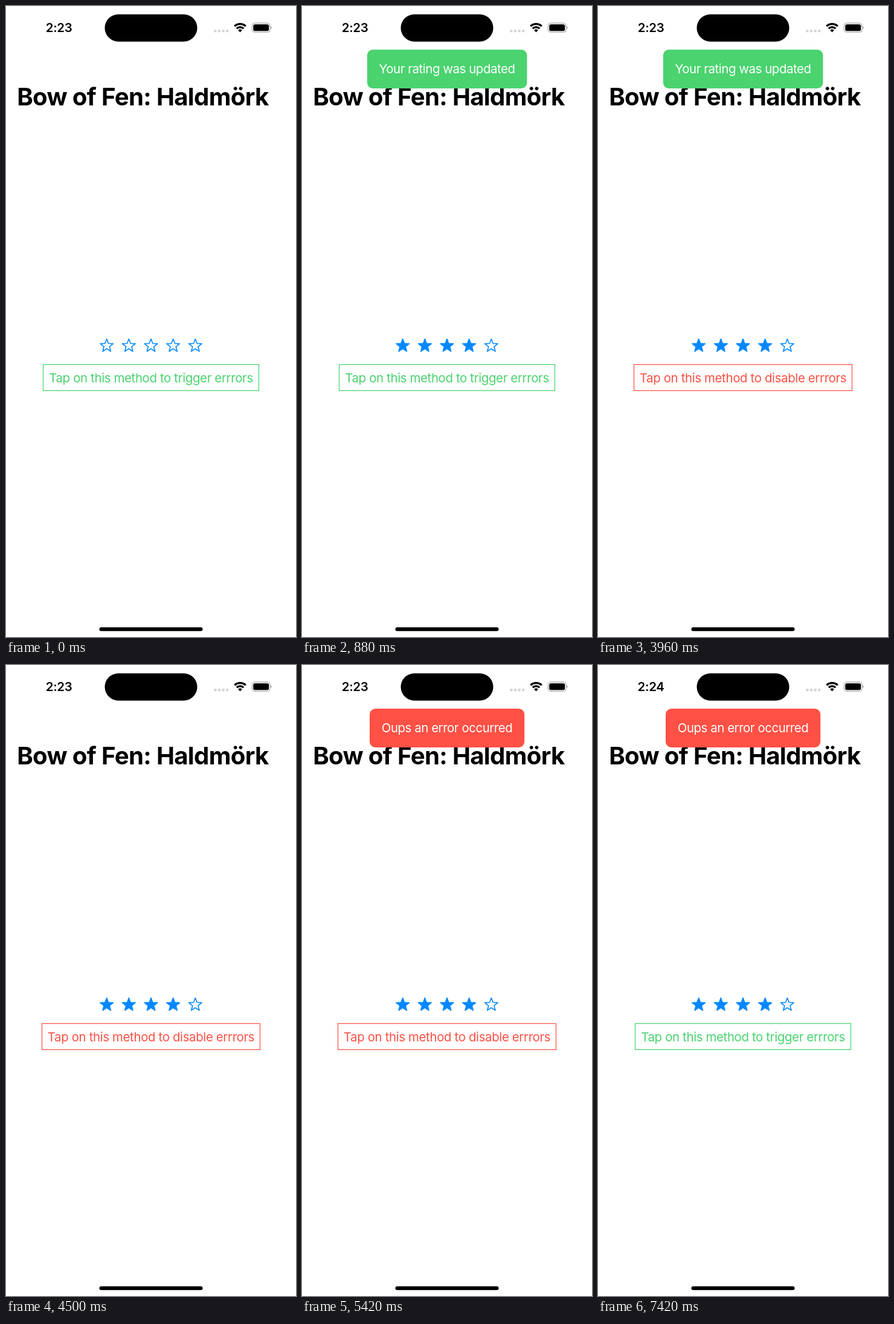
An HTML page that plays this animation: 480 px wide and 1041 px high, repeating every 8000 ms.

```html
<!DOCTYPE html>
<html lang="en">
<head>
<meta charset="utf-8">
<title>Rating screen</title>
<style>
  html, body { margin: 0; width: 100%; height: 100%; overflow: hidden; background: #fff; }
  svg { display: block; width: 100%; height: 100%; }
  text {
    font-family: Inter, "Liberation Sans", sans-serif;
    font-size: 20.4px;
    font-optical-sizing: none;
    letter-spacing: -0.35px;
  }
  .mid { text-anchor: middle; }
  #clock { font-weight: 600; letter-spacing: -0.3px; }
  #title { font-size: 40.2px; font-weight: 700; letter-spacing: -0.68px; }
  #toastText { letter-spacing: -0.43px; }
  #stars path { stroke: #08f; stroke-linejoin: round; }
</style>
</head>
<body>
<svg viewBox="0 0 480 1041" xmlns="http://www.w3.org/2000/svg">
  <rect width="480" height="1041" fill="#fff"/>

  <!-- status bar -->
  <text id="clock" class="mid" x="87.6" y="43.2">2:23</text>
  <rect x="163.5" y="13.7" width="153" height="45" rx="22.5"/>
  <g id="signal" fill="#d3d3d3"></g>
  <g id="wifi" fill="none" stroke="#000"></g>
  <rect x="407.2" y="28.2" width="30" height="15" rx="4.8" fill="none" stroke="#a8a8a8" stroke-width="1.2"/>
  <rect x="409.2" y="30.2" width="26" height="11" rx="3"/>
  <path d="M438.4 33.3a2.6 2.6 0 0 1 0 4.8z" fill="#a8a8a8"/>

  <text id="title" x="18.2" y="163.8">Bow of Fen: Haldmörk</text>

  <g id="toast">
    <rect id="toastBox" y="72" height="64" rx="9.6"/>
    <text id="toastText" class="mid" x="240" y="111.4" fill="#fff"></text>
  </g>

  <g id="stars"></g>

  <rect id="border" y="591.5" height="43" fill="none" stroke-width="1.25"/>
  <text id="label" class="mid" x="240" y="620.7"></text>

  <rect x="154.5" y="1025.1" width="171" height="6.1" rx="3.05"/>
</svg>
<script>
const LOOP = 8000;
const GREEN = '#4ad36f', RED = '#ff5145', BLUE = '#0088ff';
const RATE = 500, DISABLE = 3500, TOAST_OFF = 4500, RETRY = 4960, FAIL = 5040, ENABLE = 7030, MINUTE = 7420;

const $ = id => document.getElementById(id);

function add(parent, tag, attrs) {
  const el = document.createElementNS('http://www.w3.org/2000/svg', tag);
  set(el, attrs);
  return parent.appendChild(el);
}

function set(el, attrs) {
  for (const key in attrs) el.setAttribute(key, attrs[key]);
}

function starPath(cx, cy, outer, inner) {
  let d = '';
  for (let i = 0; i < 10; i++) {
    const r = i % 2 ? inner : outer, a = i * Math.PI / 5;
    d += (i ? 'L' : 'M') + (cx + r * Math.sin(a)).toFixed(2) + ' ' + (cy - r * Math.cos(a)).toFixed(2);
  }
  return d + 'Z';
}

// Arc of the wireless fan, 42 degrees to each side of vertical
function fan(r) {
  const dx = r * Math.sin(0.733), y = 43.5 - r * Math.cos(0.733);
  return `M${387.5 - dx} ${y}A${r} ${r} 0 0 1 ${387.5 + dx} ${y}`;
}

for (let i = 0; i < 4; i++) add($('signal'), 'circle', { cx: 346.5 + 6.6 * i, cy: 41.2, r: 2.2 });
add($('wifi'), 'path', { d: fan(13.8), 'stroke-width': 3.3 });
add($('wifi'), 'path', { d: fan(8.6), 'stroke-width': 3.2 });
add($('wifi'), 'path', { d: fan(5) + 'L387.5 43.5Z', fill: '#000', stroke: 'none' });

const stars = [0, 1, 2, 3, 4].map(i => add($('stars'), 'path', {
  d: starPath(240 + 36.65 * (i - 2), 560.6, 11.3, 4.8),
  'stroke-width': 1.6,
  fill: 'none'
}));

// A tapped control dims to a fifth, then eases back
function tapOpacity(t, start, length) {
  const p = (t - start) / length;
  if (p < 0 || p >= 1) return 1;
  return 0.2 + 0.8 * p * p * (3 - 2 * p);
}

function setText(el, text) {
  if (el.textContent !== text) el.textContent = text;
}

function showToast(text, color, width) {
  $('toast').setAttribute('visibility', text ? 'visible' : 'hidden');
  if (!text) return;
  set($('toastBox'), { x: 240.1 - width / 2, width, fill: color });
  setText($('toastText'), text);
}

function draw(t) {
  setText($('clock'), t < MINUTE ? '2:23' : '2:24');

  stars.forEach((star, i) => star.setAttribute('fill', t >= RATE && i < 4 ? BLUE : 'none'));
  const retryDim = t >= RETRY && t < FAIL ? 0.2 : tapOpacity(t, FAIL, 380);
  stars[3].setAttribute('opacity', Math.min(tapOpacity(t, RATE, 380), retryDim));

  if (t >= RATE && t < TOAST_OFF) showToast('Your rating was updated', GREEN, 264.6);
  else if (t >= FAIL) showToast('Oups an error occurred', RED, 256.2);
  else showToast('');

  const failing = t >= DISABLE && t < ENABLE;
  const color = failing ? RED : GREEN, width = failing ? 361 : 357;
  set($('border'), { x: 240 - width / 2, width, stroke: color });
  setText($('label'), `Tap on this method to ${failing ? 'disable' : 'trigger'} errrors`);
  set($('label'), {
    fill: color,
    opacity: Math.min(tapOpacity(t, DISABLE, 310), tapOpacity(t, ENABLE, 310))
  });
}

const start = performance.now();
function tick() {
  draw((performance.now() - start) % LOOP);
  requestAnimationFrame(tick);
}
tick();
</script>
</body>
</html>
```
